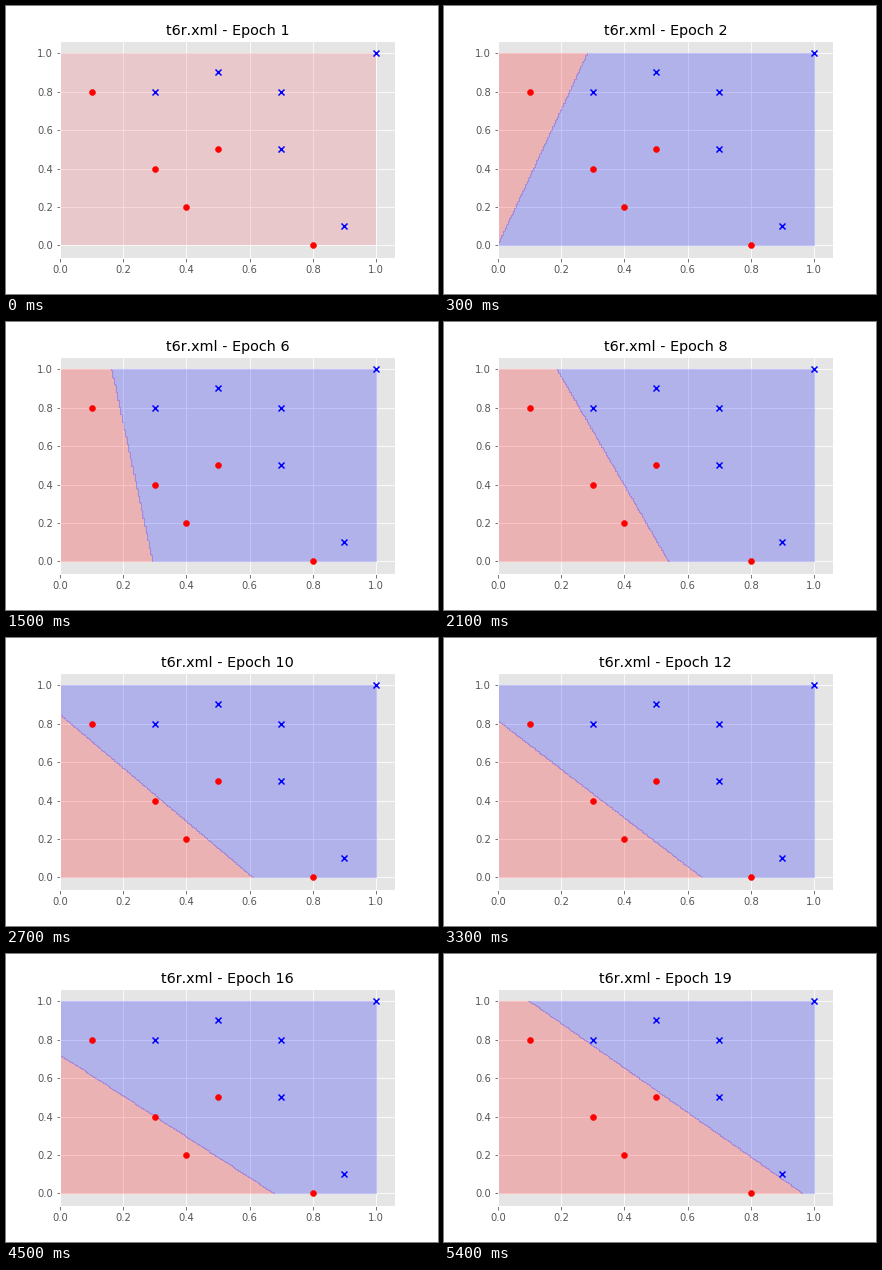
A matplotlib script that plays this animation: 432 px wide and 288 px high, repeating every 5700 ms.

```python
import numpy as np
import matplotlib.pyplot as plt
from matplotlib.animation import FuncAnimation

plt.style.use("ggplot")
plt.rcParams["font.family"] = "DejaVu Sans"
plt.rcParams["text.kerning_factor"] = 6

EPOCHS = 19
STEP_MS = 300
ALPHA = 0.22
RED_POINTS = [(0.1, 0.8), (0.3, 0.4), (0.4, 0.2), (0.5, 0.5), (0.8, 0.0)]
BLUE_POINTS = [(0.3, 0.8), (0.5, 0.9), (0.7, 0.8), (0.7, 0.5), (1.0, 1.0), (0.9, 0.1)]

# Key poses of the decision line: epoch, x where it meets y = 0, x where it meets y = 1.
KEYS = np.array([
    (2, 0.0, 0.284), (4, 0.263, 0.29), (6, 0.294, 0.164),
    (8, 0.54, 0.187), (10, 0.61, -0.11), (12, 0.645, -0.146),
    (16, 0.677, -0.263), (18, 0.71, -0.21), (19, 0.964, 0.1),
])

fig = plt.figure(figsize=(6, 4), dpi=72, facecolor="white")
fig.subplots_adjust(left=0.125, right=0.9, bottom=0.125, top=0.88)
ax = fig.add_subplot()
ax.set(xlim=(0, 1.0593), ylim=(-0.0655, 1.0655))
ticks = np.linspace(0, 1, 6)
ax.set_xticks(ticks)
ax.set_yticks(ticks)
ax.scatter(*zip(*RED_POINTS), c="red", marker="o", zorder=3)
ax.scatter(*zip(*BLUE_POINTS), c="blue", marker="x", zorder=3)
title = ax.set_title("", color="black")

axis = np.linspace(0, 1, 201)
gx, gy = np.meshgrid(axis, axis)
regions = []


def shade(classes, levels, colors):
    regions.append(ax.contourf(gx, gy, classes, levels=levels, colors=colors,
                               alpha=ALPHA, zorder=1))


def line_at(epoch):
    """Where the decision line meets the bottom and the top edge."""
    return [np.interp(epoch, KEYS[:, 0], KEYS[:, k]) for k in (1, 2)]


def update(i):
    epoch = i + 1
    while regions:
        regions.pop().remove()
    title.set_text(f"t6r.xml - Epoch {epoch}")
    if epoch == 1:
        shade(np.zeros_like(gx), [-1, 1], ["#f7616f"])
    else:
        bottom, top = line_at(epoch)
        classes = (gx > bottom + (top - bottom) * gy).astype(float)
        shade(classes, [-0.5, 0.5, 1.5], ["red", "blue"])
        regions.append(ax.contour(gx, gy, classes, levels=[0.5], colors=["#8c8cff"],
                                  alpha=0.6, linewidths=0.8, zorder=1))
    return [title]


anim = FuncAnimation(fig, update, frames=EPOCHS, interval=STEP_MS,
                     init_func=lambda: [title], repeat=True, repeat_delay=0, blit=False)
plt.show()
```
